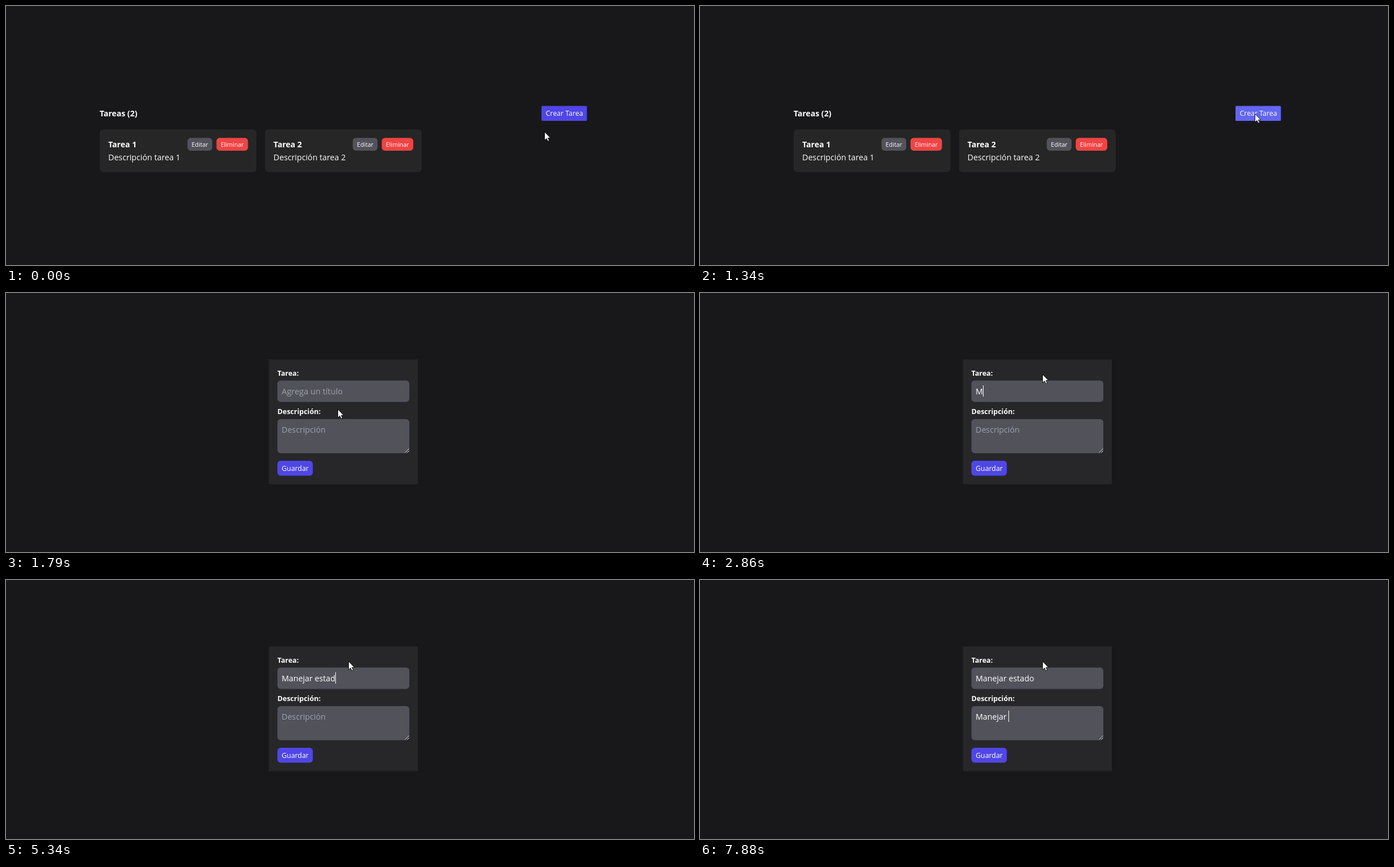
These frames come from a looping animation (1218 by 460 pixels, 8000 ms). An HTML page:

```html
<!DOCTYPE html>
<html lang="es">
<head>
<meta charset="utf-8">
<title>Tareas</title>
<style>
  html, body { margin: 0; width: 100%; height: 100%; overflow: hidden; background: #18181b; }
  svg { display: block; width: 1218px; height: 460px; }
  text { font: 14.24px "Open Sans", "Noto Sans", sans-serif; fill: #fff; white-space: pre; }
  .title { font-size: 14.1px; font-weight: 700; }
  .label { font-size: 12.5px; font-weight: 700; }
  .button { font-size: 12.4px; }
  .small { font-size: 10.7px; }
  .hint { fill: #9ca3af; }
  .wide { font-size: 14.6px; }
  .field, .edit { fill: #52525b; }
  .remove { fill: #ef4444; }
  .primary { fill: #4f46e5; }
  .primary.hover { fill: #6366f1; }
</style>
</head>
<body>
<svg viewBox="0 0 1218 460">
  <g id="list">
    <text class="title" x="165.7" y="196">Tareas (2)</text>
    <rect id="create" class="primary" x="948" y="177.5" width="80.4" height="26.5" rx="1.5"/>
    <text class="button" x="955.5" y="195.3">Crear Tarea</text>
  </g>
  <g id="form">
    <rect x="465.5" y="118" width="263.5" height="221.5" fill="#27272a"/>
    <text class="label" x="480.5" y="147">Tarea:</text>
    <rect class="field" x="480.5" y="155.5" width="233.5" height="38" rx="5.7"/>
    <text class="label" x="480.5" y="215.3">Descripción:</text>
    <rect class="field" x="480.5" y="224" width="233.5" height="60.5" rx="5.7"/>
    <path d="M706.5 283.5l7-7M710.5 283.5l3-3" stroke="#d4d4d8"/>
    <path d="M707.5 283.9l6-6M711.5 283.9l2-2" stroke="#27272a" stroke-width=".7"/>
    <rect class="primary" x="480.5" y="298" width="62.7" height="26.5" rx="5.7"/>
    <text class="button" x="488" y="316">Guardar</text>
    <text id="nameHint" class="hint wide" x="488" y="180">Agrega un título</text>
    <text id="nameText" x="488" y="180"></text>
    <text id="infoHint" class="hint" x="488" y="248.3">Descripción</text>
    <text id="infoText" x="488" y="248.3"></text>
    <rect id="caret" width="1" height="20" fill="#fff"/>
  </g>
  <path id="cursor" d="M.5 .5V15.6L4 12.3L6.3 17.2L8.7 16.1L6.4 11.3H10.8Z" fill="#fff" stroke="#000" stroke-width=".9"/>
</svg>
<script>
const LOOP = 8000, FORM_AT = 1360, BLINK = 525;
const FOCUS_NAME = 2085, FOCUS_INFO = 5740;
const $ = id => document.getElementById(id);

// One entry per key press, in ms.
const fields = [
  { id: 'name', text: 'Manejar estado', caretY: 164, keys:
    [2860, 3190, 3540, 3880, 4060, 4230, 4410, 4550, 4720, 4890, 5070, 5190, 5320, 5440] },
  { id: 'info', text: 'Manejar ', caretY: 232, keys:
    [6380, 6590, 7070, 7230, 7400, 7560, 7720, 7880] }
];

// Time, x, y of the pointer tip.
const path = [
  [0, 953, 223], [420, 953, 223], [710, 982, 191], [1360, 982, 191],
  [1790, 587, 206], [2070, 603, 172], [2290, 606, 144], [LOOP, 606, 144]
];

const card = (n, dx) => `<g transform="translate(${dx})">
  <rect x="166" y="219.3" width="277.3" height="75.7" rx="5.7" fill="#262626"/>
  <text class="title" x="181" y="251.3">Tarea ${n}</text>
  <text x="181" y="274">Descripción tarea ${n}</text>
  <rect class="edit" x="321.2" y="234.3" width="44" height="22.7" rx="5.7"/>
  <text class="small" x="328.6" y="250">Editar</text>
  <rect class="remove" x="372.6" y="234.3" width="55.8" height="22.7" rx="5.7"/>
  <text class="small" x="380" y="250">Eliminar</text>
</g>`;
$('list').insertAdjacentHTML('beforeend', card(1, 0) + card(2, 292.6));

const pen = document.createElement('canvas').getContext('2d');
pen.font = '14.24px "Open Sans", "Noto Sans", sans-serif';

const show = (el, on) => el.setAttribute('visibility', on ? 'inherit' : 'hidden');

function pointerAt(t) {
  const i = path.findIndex(p => p[0] > t);
  const [t0, x0, y0] = path[i - 1], [t1, x1, y1] = path[i];
  const k = (t - t0) / (t1 - t0), e = k * k * (3 - 2 * k);
  return [x0 + (x1 - x0) * e, y0 + (y1 - y0) * e];
}

function drawField({ id, text, keys }, t) {
  const typed = text.slice(0, keys.filter(k => k <= t).length);
  $(id + 'Text').textContent = typed;
  show($(id + 'Hint'), !typed);
  return typed;
}

function drawCaret(t, typed) {
  const n = t < FOCUS_INFO ? 0 : 1;
  const { keys, caretY } = fields[n];
  const reset = Math.max(n ? FOCUS_INFO : FOCUS_NAME, ...keys.filter(k => k <= t));
  const on = t >= reset && Math.floor((t - reset) / BLINK) % 2 === 0;
  $('caret').setAttribute('x', Math.floor(488.3 + pen.measureText(typed[n]).width));
  $('caret').setAttribute('y', caretY);
  show($('caret'), on);
}

function draw(t) {
  const [x, y] = pointerAt(t);
  const open = t >= FORM_AT;
  show($('list'), !open);
  show($('form'), open);
  $('create').classList.toggle('hover', x >= 948 && x <= 1028 && y >= 177 && y <= 204);
  drawCaret(t, fields.map(f => drawField(f, t)));
  $('cursor').setAttribute('transform', `translate(${x} ${y})`);
}

const start = performance.now();
function tick() {
  draw((performance.now() - start) % LOOP);
  requestAnimationFrame(tick);
}
tick();
</script>
</body>
</html>
```
